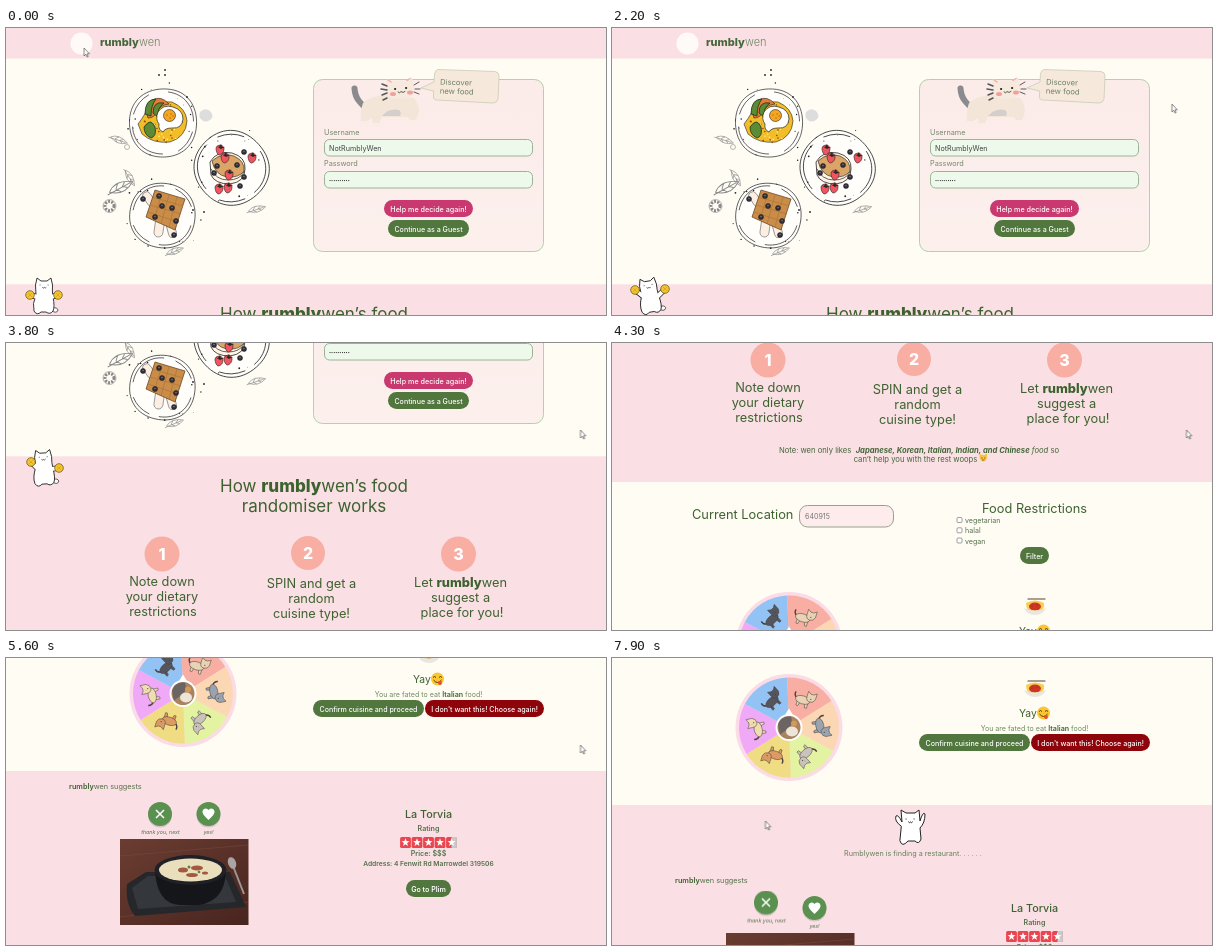
These frames come from a looping animation (600x287 px, 8 s). An HTML page:

```html
<!DOCTYPE html>
<html lang="en">
<head>
<meta charset="utf-8">
<title>Food randomiser</title>
<style>
html, body { margin: 0; width: 100%; height: 100%; overflow: hidden; background: #fffcf4; }
#stage { position: relative; width: 100%; height: 100%; overflow: hidden; contain: strict; }
svg { position: absolute; left: 0; top: 0; display: block; }
text { font: 7.1px Inter, "Open Sans", sans-serif; fill: #54704a; }
.mid { text-anchor: middle; }
.h1 { font-size: 17px; fill: #3d6230; }
.h2 { font-size: 12.8px; fill: #3d6230; }
.h3 { font-size: 10.8px; fill: #3d6230; }
.label { font-size: 7.3px; fill: #748a6b; }
.note { font-size: 7.65px; fill: #45663a; }
.btn { fill: #fff; font-weight: 500; text-anchor: middle; }
.num { font-size: 16px; font-weight: 800; fill: #fff; text-anchor: middle; }
.tiny { font-size: 5.3px; font-style: italic; text-anchor: middle; }
.semi { font-weight: 600; }
.b { font-weight: 800; }
.ink { fill: none; stroke: #222; stroke-width: .7; stroke-linecap: round; stroke-linejoin: round; }
.pale { fill: none; stroke: #888; stroke-width: .6; }

#page { animation: scroll 8s step-end infinite; }
#cursor { animation: point 8s linear infinite; }
#more { animation: push 8s step-end infinite; }
#finding { animation: show 8s step-end infinite; }
#next { animation: lift 8s ease-out infinite; }
.pose { opacity: 0; animation: pose .5s step-end infinite; }

/* The scroll advances once every 100 ms */
@keyframes scroll {
  0% { transform: translateY(0); }
  42.5% { transform: translateY(0); animation-timing-function: steps(4); }
  47.5% { transform: translateY(-143px); animation-timing-function: steps(5); }
  53.75% { transform: translateY(-337px); animation-timing-function: steps(2); }
  56.25% { transform: translateY(-592px); animation-timing-function: steps(2); }
  58.75% { transform: translateY(-604px); }
  91.25% { transform: translateY(-604px); animation-timing-function: steps(4); }
  96.25%, 100% { transform: translateY(-570px); }
}
@keyframes point {
  0% { transform: translate(78px, 20px); }
  11.25% { transform: translate(116px, 20px); }
  13.75% { transform: translate(119.5px, 21.5px); }
  16.25% { transform: translate(132px, 28px); }
  22.5% { transform: translate(446px, 60px); }
  28.75% { transform: translate(588px, 80px); }
  32.5%, 77.5% { transform: translate(574.5px, 87px); }
  78.75% { transform: translate(528px, 95px); }
  86.25% { transform: translate(200px, 150px); }
  88.75%, 100% { transform: translate(153.5px, 163px); }
}
@keyframes push { 0% { transform: none; } 91.25%, 100% { transform: translateY(60px); } }
@keyframes show { 0% { opacity: 0; } 91.25%, 100% { opacity: 1; } }
@keyframes lift { 0%, 88% { transform: none; } 89.75%, 100% { transform: translateY(-5.5px); } }
@keyframes pose { 0% { opacity: 1; } 20%, 100% { opacity: 0; } }
</style>
</head>
<body>
<div id="stage">
<svg id="page" width="600" height="960" viewBox="0 0 600 960">
  <defs>
    <linearGradient id="card" x2="0" y2="1"><stop stop-color="#fbebe9"/><stop offset="1" stop-color="#fcf0ed"/></linearGradient>
    <linearGradient id="wood" x2="1" y2="1"><stop stop-color="#6b3d31"/><stop offset="1" stop-color="#48251f"/></linearGradient>
    <path id="leaf" class="pale" d="M-9 0Q-2-6 9 0Q0 6-9 0ZM-11 1L7 0M-4 0l3-3M-4 0l3 3M1 0l3-2M1 0l3 2"/>
    <g id="plate">
      <path class="ink" style="fill:#fffefb" d="M-33-3C-32-24-16-35 4-34C25-33 35-17 34 2C33 22 19 35-2 34C-22 33-34 18-33-3Z"/>
      <path class="ink" d="M-30 4C-29 20-16 31 0 31M6-31C22-29 31-16 31-2M30 9Q26 22 16 28M-29-9Q-25-22-14-28"/>
    </g>
    <g id="berry"><circle r="2.5" fill="#33313a" stroke="#111" stroke-width=".5"/><circle r=".8" cy="-.5" fill="#77717f"/></g>
    <g id="straw"><path d="M-4-2C-3-6 4-6 4-1C4 3 1 5-1 5C-3 4-4 1-4-2Z" fill="#f2545f" stroke="#222" stroke-width=".6"/><path d="M-4-4l3 1l2-3l1 3l3 0l-4 2z" fill="#272b25"/></g>
    <g id="kitty" stroke="#4b423d" stroke-width=".5">
      <path d="M-7 1q-4-2-3-6" fill="none" stroke-width="1.4"/>
      <path d="M-6 2v6h2l1-4h5l1 4h2v-6z"/><ellipse rx="7.5" ry="4" cx="-1" cy="1"/>
      <path d="M2-4l0-5l3 2h3l3-2v6q-1 4-5 4t-4-5z"/><path d="M5-4h.1M8.5-4h.1M6-2h1" stroke-width="1" fill="none"/>
    </g>
  </defs>

  <rect width="600" height="960" fill="#fffcf4"/>
  <g fill="#fae0e4"><rect width="600" height="30.5"/><rect y="256.3" width="600" height="219.7"/><rect y="717" width="600" height="243"/></g>

  <circle cx="75.5" cy="15.5" r="11" fill="#fffaf7"/>
  <text x="94" y="18" style="font-size:11px;fill:#45683a"><tspan class="b">rumbly</tspan><tspan font-weight="300" fill="#6b8562">wen</tspan></text>

  <!-- plates -->
  <g id="food">
    <use href="#leaf" transform="translate(113 112) rotate(20)"/>
    <use href="#leaf" transform="translate(115 159) rotate(-25) scale(1.4 1.6)"/>
    <use href="#leaf" transform="translate(124 150) rotate(60)"/>
    <use href="#leaf" transform="translate(251 181) rotate(-15)"/>
    <use href="#leaf" transform="translate(169 223) rotate(-20)"/>
    <g class="pale"><circle cx="103.5" cy="178" r="6.5"/><circle cx="103.5" cy="178" r="4.5" stroke-dasharray="2 1.2" style="stroke-width:3"/><circle cx="121" cy="119" r="2.5"/></g>
    <path d="M194 84q5-5 10-1q5 5 0 9q-5 3-8 0q-4-3-2-8z" fill="#ddd"/>

    <use href="#plate" x="156.500" y="95"/>
    <path d="M140 84q11-12 26-10q14 6 15 19q-1 16-17 21q-17 2-28-8l-4-10q4-5 8-12z" fill="#f2bd29" stroke="#222" stroke-width=".6"/>
    <g id="grains"></g>
    <path d="M142 90q-5-11 4-18q9-5 17 4q-9 1-12 8q-3 6-9 6z" fill="#e87b35" stroke="#222" stroke-width=".6"/>
    <g fill="#5c8a35" stroke="#1e351a" stroke-width=".8"><path d="M139 86q0-15 11-15q-5 6-5 17z"/><path d="M147 85q0-12 11-10q-7 5-6 14z"/><path d="M138 99q7-10 11 0q2 9-4 11q-7-3-7-11z"/></g>
    <path d="M152 84q5-8 15-5q10 3 10 12q-1 10-11 9q-7 0-9 4q-5-2-4-8q-4-5-1-12z" fill="#fff" stroke="#222" stroke-width=".7"/>
    <circle cx="163.500" cy="87.500" r="6" fill="#f6a51f" stroke="#222" stroke-width=".6"/>
    <path class="ink" d="M161 87h.1M165 86h.1M164 90h.1M167 88h.1"/>

    <use href="#plate" transform="translate(225 139.5) rotate(50) scale(1.1 1.06)"/>
    <path d="M204 134q7-12 22-9q14 4 13 16q0 13-15 15q-15 0-19-9z" fill="#fff4e5" stroke="#222" stroke-width=".8"/>
    <path d="M206 133q10-9 22-5q11 5 10 15q-5 7-17 6q-12-2-15-16z" fill="#dba568" stroke="#222" stroke-width=".6"/>
    <path class="ink" d="M205 141q5 11 17 11t16-8"/>

    <use href="#plate" transform="translate(156.5 187) rotate(100) scale(.96)"/>
    <g fill="#fbeee2" stroke="#666" stroke-width=".6"><rect x="149" y="184" width="9" height="25" rx="4.5" transform="rotate(8 153 197)"/><rect x="161" y="188" width="8" height="22" rx="4" transform="rotate(-15 164 200)"/><rect x="139" y="163" width="8" height="17" rx="4" transform="rotate(-35 143 171)"/></g>
    <path d="M149 162L179 171L169 202L140 189Z" fill="#c98d49" stroke="#5f3a17" stroke-width=".7"/>
    <path d="M156 165l-8 27M163 167l-8 29M171 169l-8 30M146 169l31 9M144 177l31 9M142 184l30 10" stroke="#aa7034" stroke-width=".6"/>
    <g id="toppings"></g>
  </g>

  <!-- sign-in card -->
  <rect x="307.5" y="51.5" width="230" height="172" rx="9" fill="url(#card)" stroke="#b4d0ad"/>
  <g stroke="#9bb497" fill="#edf9eb"><rect x="318.5" y="111.5" width="208" height="16.5" rx="5"/><rect x="318.5" y="143.5" width="208" height="16.5" rx="5"/></g>
  <text class="label" x="318" y="106.5">Username</text>
  <text x="323" y="122.5" style="font-size:7.2px;fill:#444">NotRumblyWen</text>
  <text class="label" x="318" y="138">Password</text>
  <text x="323" y="153.5" style="font-size:3.7px;fill:#222">••••••••••</text>
  <rect x="378" y="172" width="89" height="17" rx="8.5" fill="#c9386e"/>
  <text class="btn" x="422.5" y="183.500" style="font-size:7.2px">Help me decide again!</text>
  <rect x="382" y="192" width="81" height="17" rx="8.5" fill="#51763e"/>
  <text class="btn" x="422.5" y="203.5">Continue as a Guest</text>

  <g stroke-linecap="round">
    <path d="M348.500 60.500Q349 68 353 73T360 80" fill="none" stroke="#8a8a8f" stroke-width="6"/>
    <path d="M357 75Q366 67 381 67L408 70Q415 79 412 87L410 92H404L402 89H376L373 95H367L366 90L361 93H355Q354 83 357 75Z" fill="#f4e5d9"/>
    <path d="M376 88q7-8 17-6q3 3 1 6z" fill="#d3cfcc"/>
    <path d="M379 62L381 51L388 54Q394 52 399 53L406 49L408 61Q407 71 394 71Q380 71 379 62Z" fill="#f6e9de"/>
    <path d="M382 52l3 2M404 50.500l-3 2" stroke="#f0b0a2" stroke-width="1.5"/>
    <path d="M376 56l5 2M375 61l6 1M376 67l5-2M377 72l4-2" stroke="#55555a" stroke-width="1.5"/>
    <path d="M389 61h.2M400 60h.2" stroke="#222" stroke-width="2"/>
    <path d="M392 64q2 2 3-.5q2 2 4 0M408 57l5-3M409 61h5M408 64l5 2" fill="none" stroke="#333" stroke-width=".8"/>
    <g fill="#f3a09b"><ellipse cx="387" cy="66" rx="3" ry="2"/><ellipse cx="404" cy="64.5" rx="3" ry="2"/></g>
  </g>
  <path d="M432 41.5L489 43.5Q493 44 493 48L492 71Q491 75 487 75L431 72Q427 72 427.5 68L427.7 63L415 60L428 54L428.5 46Q429 42 432 41.5Z" fill="#f6e9dc" stroke="#c8cdb5" stroke-width=".8"/>
  <g transform="rotate(2 434 57)"><text x="434" y="56.500" style="font-size:7.7px;fill:#6c8262">Discover</text><text x="434" y="65.500" style="font-size:7.7px;fill:#6c8262">new food</text></g>

  <g id="dancer"></g>

  <!-- how it works -->
  <g class="mid">
    <text class="h1" x="308" y="292">How <tspan class="b">rumbly</tspan>wen’s food</text>
    <text class="h1" x="308" y="311.5">randomiser works</text>
    <g fill="#f8aea3"><circle cx="156" cy="354" r="17.5"/><circle cx="302" cy="353" r="17"/><circle cx="452.5" cy="354" r="17.5"/></g>
    <text class="num" x="156" y="360">1</text><text class="num" x="302" y="358.5">2</text><text class="num" x="452.5" y="360">3</text>
    <text class="h2" x="156" y="386">Note down</text><text class="h2" x="156" y="401">your dietary</text><text class="h2" x="157" y="415.5">restrictions</text>
    <text class="h2" x="305.5" y="388">SPIN and get a</text><text class="h2" x="305.5" y="403">random</text><text class="h2" x="305.5" y="417.5">cuisine type!</text>
    <text class="h2" x="454.5" y="387">Let <tspan class="b">rumbly</tspan>wen</text><text class="h2" x="454.5" y="402">suggest a</text><text class="h2" x="456" y="416.5">place for you!</text>
    <text class="note" x="307" y="446.5">Note: wen only likes&#160; <tspan font-weight="700" font-style="italic">Japanese, Korean, Italian, Indian, and Chinese</tspan> <tspan font-style="italic">food</tspan> so</text>
    <text class="note" x="303.5" y="455.5">can’t help you with the rest woops</text>
  </g>
  <path d="M367.5 450l0-2.5l2.5 1.5h2.5l2.5-1.5v4q-1 4-3.7 4t-3.800-4z" fill="#f5c242"/>
  <path d="M369 452h1.5M372 452h1.5M370 454h2.5" stroke="#5a3b14" stroke-width=".6"/>

  <!-- filters -->
  <text class="h2" x="80" y="513">Current Location</text>
  <rect x="187.5" y="499.5" width="94" height="21.5" rx="8" fill="#fdeceb" stroke="#97a08c"/>
  <text x="193" y="512.5" style="fill:#777">640915</text>
  <text class="h2 mid" x="422.5" y="507">Food Restrictions</text>
  <g fill="#fff" stroke="#777" stroke-width=".7"><rect x="345" y="511.5" width="5" height="5" rx="1"/><rect x="345" y="521.8" width="5" height="5" rx="1"/><rect x="345" y="532" width="5" height="5" rx="1"/></g>
  <text x="353" y="517">vegetarian</text><text x="353" y="527.3">halal</text><text x="353" y="537.5">vegan</text>
  <rect x="408" y="541" width="29" height="17" rx="8.5" fill="#51763e"/>
  <text class="btn" x="422.5" y="552.5">Filter</text>

  <g id="wheel" transform="translate(177 639.5)"></g>

  <!-- outcome -->
  <path d="M414 597q9-5 18 0q1 9-9 10q-9 0-9-10z" fill="#f4d04d"/>
  <ellipse cx="423" cy="600.5" rx="6" ry="4" fill="#cf3425"/>
  <path d="M412 602q11 5 22 0q-3 7-11 7t-11-7z" fill="#e9e6e0"/>
  <path d="M416 593h17M420 600h.1M425 599h.1" stroke="#5c4026" stroke-width="1.2" stroke-linecap="round"/>
  <text class="h3" x="407" y="629" style="font-size:10.3px">Yay</text>
  <circle cx="431.5" cy="625" r="6.5" fill="#fcc62f"/>
  <path d="M427 623.5q1.5-2 3 0M433 623.5q1.5-2 3 0M427.5 626q4 5 8 0" fill="none" stroke="#5a3710" stroke-width="1"/>
  <path d="M432 628l3.5-1q1 4-1.5 4q-2 0-2-3z" fill="#e5493f"/>
  <text class="mid" x="422.5" y="642.5" style="fill:#6d8a60">You are fated to eat <tspan class="semi" fill="#3d6230">Italian</tspan> food!</text>
  <rect x="307" y="646" width="111" height="17" rx="8.5" fill="#51763e"/>
  <text class="btn" x="362.5" y="657.5">Confirm cuisine and proceed</text>
  <rect x="419" y="646" width="119" height="17" rx="8.5" fill="#8e040b"/>
  <text class="btn" x="478.5" y="657.5">I don't want this! Choose again!</text>

  <g id="finding">
    <g class="ink" style="fill:#fff;stroke-width:1">
      <path d="M289 738Q282 733 284 728Q286 726 290 734L289 722L294 725H303L307 722L308 733Q311 723 313 726Q313 735 308 740L309 751Q307 757 303 753H296Q290 760 288 753Z"/>
      <path d="M294 731h.2M302 731h.2M296.5 734q1 1.5 2 0q1 1.5 2 0"/>
    </g>
    <text class="mid" x="301" y="768" style="font-size:7.2px;fill:#66805b">Rumblywen is finding a restaurant. . . . . .</text>
  </g>

  <g id="more">
    <text x="63" y="734.5" style="font-size:7.3px"><tspan class="semi" fill="#3d6230">rumbly</tspan>wen suggests</text>
    <g id="next">
      <circle cx="154" cy="761.5" r="12" fill="#0002"/><circle cx="154" cy="760" r="12" fill="#5a9150"/>
      <path d="M150 756l8 8m0-8l-8 8" stroke="#fff" stroke-width="1.5"/>
      <text class="tiny" x="154.5" y="780">thank you, next</text>
    </g>
    <circle cx="202.5" cy="761.5" r="12" fill="#0002"/><circle cx="202.5" cy="760" r="12" fill="#5a9150"/>
    <path d="M202.5 766Q196 760 196.5 757.5Q197 754.5 200 754.5Q201.5 754.5 202.5 756Q203.5 754.5 205 754.5Q208 754.5 208.5 757.5Q209 760 202.5 766Z" fill="#fff"/>
    <text class="tiny" x="202.5" y="780">yes!</text>

    <rect x="114" y="785" width="128.5" height="86" fill="url(#wood)"/>
    <path d="M114 802L242 791M114 863L242 848" stroke="#7a4b3c" stroke-width="1" opacity=".5"/>
    <path d="M121 830L140 818H224L240 853L129 862Q119 850 121 830Z" fill="#25272b"/>
    <path d="M126 834L142 822H219L230 848L132 855Z" fill="#34373c"/>
    <path d="M149 817Q151 850 174 851H193Q219 847 220 817Z" fill="#151619"/>
    <ellipse cx="184.5" cy="816" rx="36" ry="15" fill="#202126"/>
    <ellipse cx="184.5" cy="816" rx="31.5" ry="11.5" fill="#e9dfbd"/>
    <g fill="#a2593e"><ellipse cx="177" cy="816" rx="5" ry="2.5"/><ellipse cx="191" cy="814" rx="6" ry="2.5"/><ellipse cx="186" cy="821" rx="6" ry="2"/><ellipse cx="199" cy="819" rx="3" ry="1.5"/></g>
    <g fill="#63813e"><circle cx="183" cy="813" r="1.5"/><circle cx="193" cy="818" r="1.3"/></g>
    <path d="M227 812L238 840" stroke="#9a9595" stroke-width="2"/><ellipse cx="226" cy="809" rx="4" ry="6" fill="#aaa5a3" transform="rotate(-20 226 809)"/>

    <g class="mid">
      <text class="h3" x="422.5" y="764" style="font-weight:500">La Torvia</text>
      <text class="semi" x="422.5" y="776.5">Rating</text>
      <g id="stars"></g>
      <text class="semi" x="422.5" y="801.5">Price: $$$</text>
      <text class="semi" x="422.5" y="812" style="font-size:6.7px">Address: 4 Fenwit Rd Marrowdel 319506</text>
      <rect x="400" y="826" width="45" height="17" rx="8.5" fill="#51763e"/>
      <text class="btn semi" x="422.5" y="837.5">Go to Plim</text>
    </g>
  </g>
</svg>

<svg width="600" height="287" viewBox="0 0 600 287">
  <path id="cursor" d="M0 0V8L1.8 6.3L3 9L4.2 8.5L3 5.8H5.4Z" fill="#fff" stroke="#555" stroke-width=".7"/>
</svg>
</div>

<script>
const put = (id, html) => document.getElementById(id).innerHTML += html;
const times = (n, fn) => Array.from({ length: n }, (_, i) => fn(i)).join('');
const place = (name, list) => list.map(([x, y]) => `<use href="#${name}" x="${x}" y="${y}"/>`).join('');
const polar = (r, deg) => [r * Math.sin(deg * Math.PI / 180), -r * Math.cos(deg * Math.PI / 180)];

let seed = 7;
const rand = () => (seed = seed * 16807 % 2147483647) / 2147483647;

// Food details
put('grains', times(60, () => {
  const [x, y] = polar(20 * Math.sqrt(rand()), rand() * 360);
  return `<circle cx="${158 + x}" cy="${95 + y}" r=".8" fill="${rand() < .6 ? '#7c4b16' : '#fff0a0'}"/>`;
}));
put('toppings',
  place('straw', [[214, 122], [219, 130], [246, 130], [223, 147], [222, 160], [213, 161]]) +
  place('berry', [[238, 149], [211, 138], [208, 145], [238, 124], [231, 137], [234, 158],
    [153, 168], [149, 189], [166, 180], [156, 178], [170, 193], [137, 171], [168, 207]]));
put('food', times(3, p => times(14, () => {
  const [x, y] = polar(27 + rand() * 14, rand() * 360);
  return `<circle cx="${[157, 225, 156][p] + x}" cy="${[95, 139, 187][p] + y}" r="${.3 + rand() * .6}" fill="#222"/>`;
})) + [[159, 42], [153, 47], [159, 47], [181, 69], [187, 182], [198, 184]]
  .map(([x, y]) => `<circle cx="${x}" cy="${y}" r=".9" fill="#222"/>`).join(''));

// Dancing cat: lean, then both pompoms
const poses = [
  [0, 24, 267, 52, 267], [7, 24, 257, 53, 261], [-9, 23, 262, 53, 261],
  [-4, 25, 262, 53, 268], [-2, 25, 262, 53, 258]
];
put('dancer', poses.map(([lean, lx, ly, rx, ry], i) => {
  const arms = `M32 269L${lx} ${ly}M45 269L${rx} ${ry}`;
  const pom = (x, y) => `<circle cx="${x}" cy="${y}" r="4.3" fill="#f4c52f" stroke="#5d4a12" stroke-width=".7"/>
    <path d="M${x - 2} ${y - 2}l4 4m0-4l-4 4" stroke="#d29f16" stroke-width=".7"/>`;
  return `<g class="pose" style="animation-delay:${i * 100 - 500}ms">
    <path d="${arms}" stroke="#222" stroke-width="5.5"/>
    <g transform="rotate(${lean} 38 270)">
      <path class="ink" style="fill:#fff" d="M46 283q5 3 6-1q-1-3-5-2"/>
      <path d="M29.500 257L31 250L35 253H41L45 250L46.500 257Q46 263 47 269Q49 279 47 283Q44 287 40 284H35Q31 288 28 283Q26 276 30 267Z" fill="#fff" stroke="#222" stroke-width=".9"/>
      <path class="ink" d="M34 257h.2M42 257h.2M36.5 259.5q1 1.2 1.8 0q1 1.2 1.8 0"/>
    </g>
    <path d="${arms}" stroke="#fff" stroke-width="4"/>
    ${pom(lx, ly)}${pom(rx, ry)}</g>`;
}).join(''));

// Wheel
const slices = ['#f8aea3', '#fcd7b4', '#e3f3a2', '#f0dc82', '#efa9f7', '#93c3f5'];
const coats = ['#e8d3b4', '#9aa4b0', '#c9c3bb', '#dd9a63', '#f0ddb0', '#55565c'];
put('wheel', '<circle r="53.5" fill="#fadbe6"/>' + slices.map((color, i) => {
  const a = i * 60 - 2, [cx, cy] = polar(32, a + 30);
  return `<path d="M0 0L${polar(50, a)}A50 50 0 0 1 ${polar(50, a + 60)}Z" fill="${color}"/>
    <use href="#kitty" fill="${coats[i]}" transform="translate(${cx} ${cy}) rotate(${a + 20})"/>`;
}).join('') + `<path d="M-5-11L0-19L5-11Z" fill="#fff"/><circle r="13.5" fill="#fff"/>
  <circle r="11.5" fill="#a9825f"/><path d="M-11-3Q-8-12 2-11Q5-3-2 2T-9 7Z" fill="#6a6462"/>
  <ellipse cx="3" cy="4" rx="6" ry="5" fill="#eee4d8"/><circle cx="5" cy="-4" r="3" fill="#d39a55"/>`);

// Rating
const star = times(10, k => {
  const [x, y] = polar(k % 2 ? 1.7 : 4.2, k * 36);
  return `${x.toFixed(2)},${y.toFixed(2)} `;
});
put('stars', times(5, i => `<g transform="translate(${399.5 + i * 11.5} 788.5)">
  <rect x="-5.4" y="-5.4" width="10.8" height="10.8" rx="1.5" fill="#ea4650"/>
  ${i === 4 ? '<path d="M0-5.4H4Q5.4-5.4 5.4-4V4Q5.4 5.4 4 5.4H0Z" fill="#c9c9c9"/>' : ''}
  <polygon points="${star}" fill="#fff"/></g>`));
</script>
</body>
</html>
```
